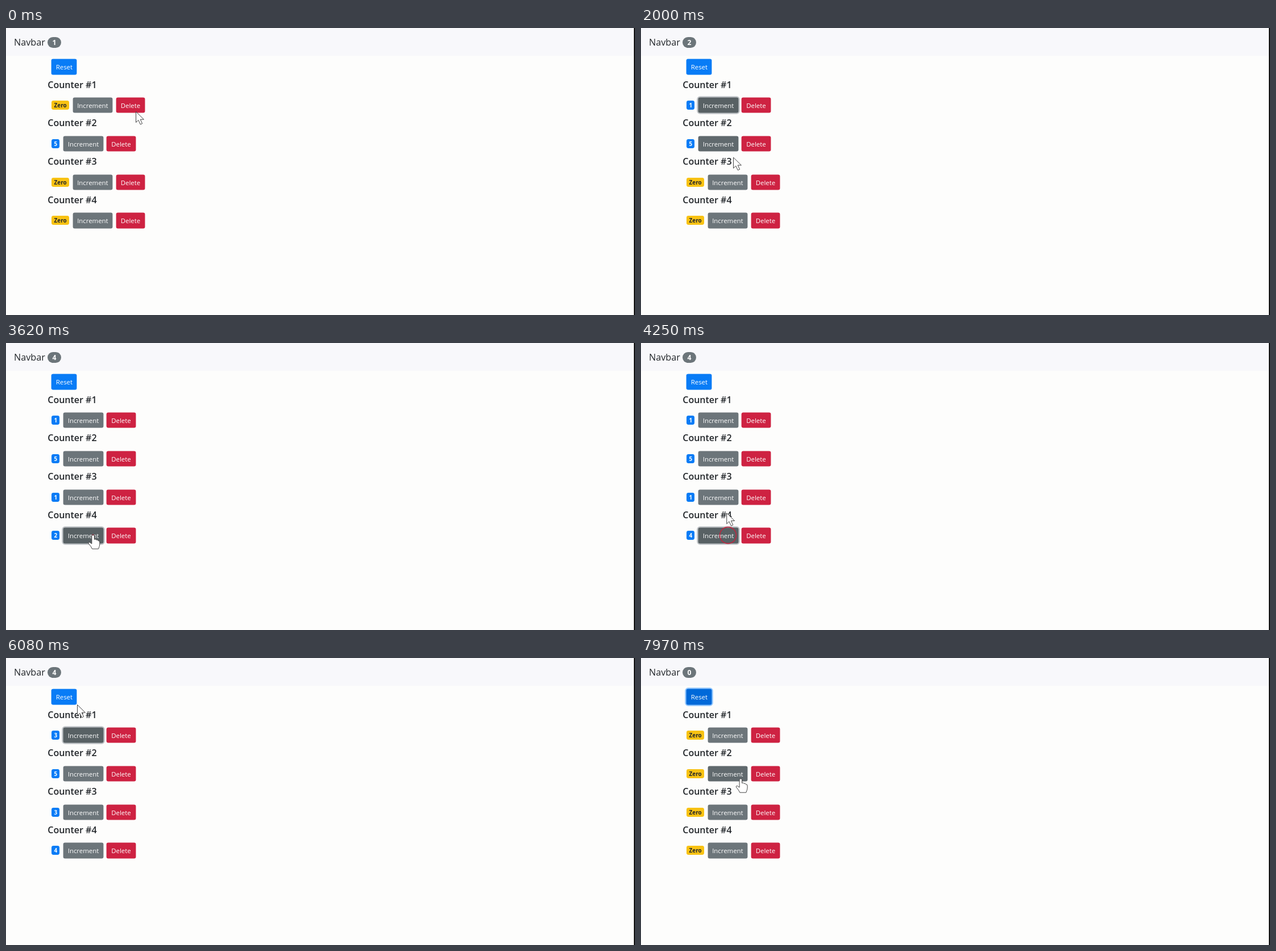
Recreate the animation shown at these times as an HTML page. Size 1106 px wide and 506 px high, loop 8000 ms.

```html
<!DOCTYPE html>
<html lang="en">
<head>
<meta charset="utf-8">
<title>Counters</title>
<style>
  html, body { margin: 0; width: 100%; height: 100%; overflow: hidden; }
  body { position: relative; background: #fdfdfc; color: #212529; font-family: "Open Sans", "Noto Sans", sans-serif; }
  body * { position: absolute; box-sizing: border-box; white-space: nowrap; }
  .navbar { left: 0; top: 0; width: 1104px; height: 49px; background: #f8f8fb; }
  .brand { left: 14px; top: 13px; font-size: 16.2px; line-height: 24px; }
  .edge { left: 1104px; top: 0; width: 2px; height: 506px; background: #111; }
  .heading { left: 73.3px; font-size: 16px; font-weight: 600; line-height: 20px; }
  .badge { left: 80.3px; height: 16px; border-radius: 3.4px; font-size: 9.9px; font-weight: 700; line-height: 16px; text-align: center; }
  .pill { left: 73.3px; top: 16px; width: 23.6px; height: 19px; border-radius: 10px; background: #6c757a; color: #fff; font-size: 12.2px; line-height: 19px; }
  .button { height: 26.4px; border-radius: 2.8px; color: #fff; font-size: 11.4px; font-weight: 500; line-height: 27.8px; text-align: center; }
  svg { left: 0; top: 0; overflow: visible; }
</style>
</head>
<body>
<div class="navbar"></div>
<div class="brand">Navbar</div>
<div class="badge pill" id="total"></div>
<div class="edge"></div>
<script>
const LOOP = 8000, ROW = 67.75, FADE = 150, RELEASE = 80, RING_LIFE = 300;

// Cursor stops: time, x, y
const path = [
  [20, 228, 147], [530, 173, 139], [1530, 173, 139], [2280, 157, 268], [2440, 157, 268],
  [2740, 153, 339], [4100, 153, 339], [4380, 148, 268], [4770, 148, 268], [5040, 146, 139],
  [5730, 146, 139], [6080, 125, 82], [6830, 125, 82], [7020, 105, 70], [7400, 105, 70], [8130, 185, 233]
];

// Press time and counter index; -1 is the reset button
const clicks = [
  [1200, 0], [2330, 2], [2830, 3], [3220, 3], [3610, 3], [3960, 3],
  [4420, 2], [4700, 2], [5200, 0], [5480, 0], [7080, -1]
];

const palette = {
  reset: { off: [8, 124, 246], on: [0, 105, 217], ring: "rgba(38,143,255,.5)" },
  increment: { off: [108, 117, 122], on: [88, 97, 100], ring: "rgba(130,138,145,.5)" },
  remove: { off: [206, 34, 66], on: [186, 28, 54] }
};

function add(className, text = "") {
  const el = document.createElement("div");
  el.className = className;
  el.textContent = text;
  document.body.append(el);
  return el;
}

function addButton(kind, text, index, x, y, width) {
  const el = add("button", text);
  el.style.top = y + "px";
  el.style.width = width + "px";
  return { el, kind, index, x, y, width };
}

const buttons = [addButton("reset", "Reset", -1, 80.3, 55.2, 44.2)];
const badges = [];
for (let i = 0; i < 4; i++) {
  const y = i * ROW;
  add("heading", "Counter #" + (i + 1)).style.top = 89.6 + y + "px";
  const badge = add("badge");
  badge.style.top = 128 + y + "px";
  badges.push(badge);
  buttons.push(addButton("increment", "Increment", i, 117.6, 123.1 + y, 69.6));
  buttons.push(addButton("remove", "Delete", i, 193.8, 123.1 + y, 50.2));
}

document.body.insertAdjacentHTML("beforeend", `
  <svg width="1106" height="506">
    <circle id="ring" fill="none" stroke="#c8203c" stroke-width="1.4"/>
    <g id="cursor" fill="#fff" stroke="#444" stroke-width="1" stroke-linejoin="round">
      <path id="arrow" d="M.5 .5V19.5L4.8 15.4L8.3 23L11.6 21.5L8.2 14.2H14.4Z"/>
      <path id="hand" d="M-2.2 1.2Q0-2.2 2.3 1.2V7.4Q4.8 5.8 5.7 8.2Q8.2 7 9 9.6Q11.6 9 11.8 12V16Q11.6 19 9.5 24H-1.5Q-3 20-7.5 15Q-8.8 12-6 12.2L-2.2 15Z"/>
    </g>
  </svg>`);
const [total, ring, cursor, arrow, hand] =
  ["total", "ring", "cursor", "arrow", "hand"].map(id => document.getElementById(id));

function cursorAt(t) {
  const next = path.findIndex(stop => stop[0] > t);
  if (next === 0) return path[0].slice(1);
  const [t0, x0, y0] = path[next - 1], [t1, x1, y1] = path[next];
  const u = (t - t0) / (t1 - t0), eased = u * u * (3 - 2 * u);
  return [x0 + (x1 - x0) * eased, y0 + (y1 - y0) * eased];
}

function countsAt(t) {
  let counts = [0, 5, 0, 0];
  for (const [time, index] of clicks) {
    if (time + RELEASE > t) break;
    if (index < 0) counts = [0, 0, 0, 0];
    else counts[index]++;
  }
  return counts;
}

// A one-digit badge is narrower, which pulls its buttons left
const leftOf = (button, counts) => button.x - (counts[button.index] ? 16.4 : 0);

function hoveredAt(t) {
  const [x, y] = cursorAt(t), counts = countsAt(t);
  return buttons.find(b => {
    const left = leftOf(b, counts);
    return x >= left && x <= left + b.width && y >= b.y && y <= b.y + 23.7;
  });
}

function draw(t) {
  const counts = countsAt(t);
  const lastClick = clicks.filter(click => click[0] <= t).pop();
  const recent = Array.from({ length: 10 }, (_, i) => hoveredAt(Math.max(0, t - i * FADE / 10)));

  total.textContent = counts.filter(Boolean).length;
  badges.forEach((badge, i) => {
    const n = counts[i];
    badge.textContent = n || "Zero";
    badge.style.width = n ? "14px" : "30.6px";
    badge.style.background = n ? "#087cf6" : "#f8c213";
    badge.style.color = n ? "#fff" : "#212529";
  });

  for (const b of buttons) {
    const { off, on, ring: glow } = palette[b.kind];
    const focused = lastClick && glow && b.index === lastClick[1];
    const amount = focused ? 1 : recent.filter(h => h === b).length / recent.length;
    const color = `rgb(${off.map((c, i) => Math.round(c + (on[i] - c) * amount))})`;
    b.el.style.left = leftOf(b, counts) + "px";
    b.el.style.background = color;
    b.el.style.boxShadow = `0 0 0 .4px ${color}` + (focused ? `, 0 0 0 2.7px ${glow}` : "");
  }

  const age = lastClick ? t - lastClick[0] : RING_LIFE;
  ring.style.display = age < RING_LIFE ? "" : "none";
  if (age < RING_LIFE) {
    const [x, y] = cursorAt(lastClick[0]);
    ring.setAttribute("cx", x);
    ring.setAttribute("cy", y);
    ring.setAttribute("r", 0.5 + age * 0.048);
  }

  const [x, y] = cursorAt(t);
  cursor.setAttribute("transform", `translate(${x} ${y})`);
  arrow.style.display = recent[0] ? "none" : "";
  hand.style.display = recent[0] ? "" : "none";
}

const start = performance.now();
function tick() {
  draw((performance.now() - start) % LOOP);
  requestAnimationFrame(tick);
}
tick();
</script>
</body>
</html>
```
